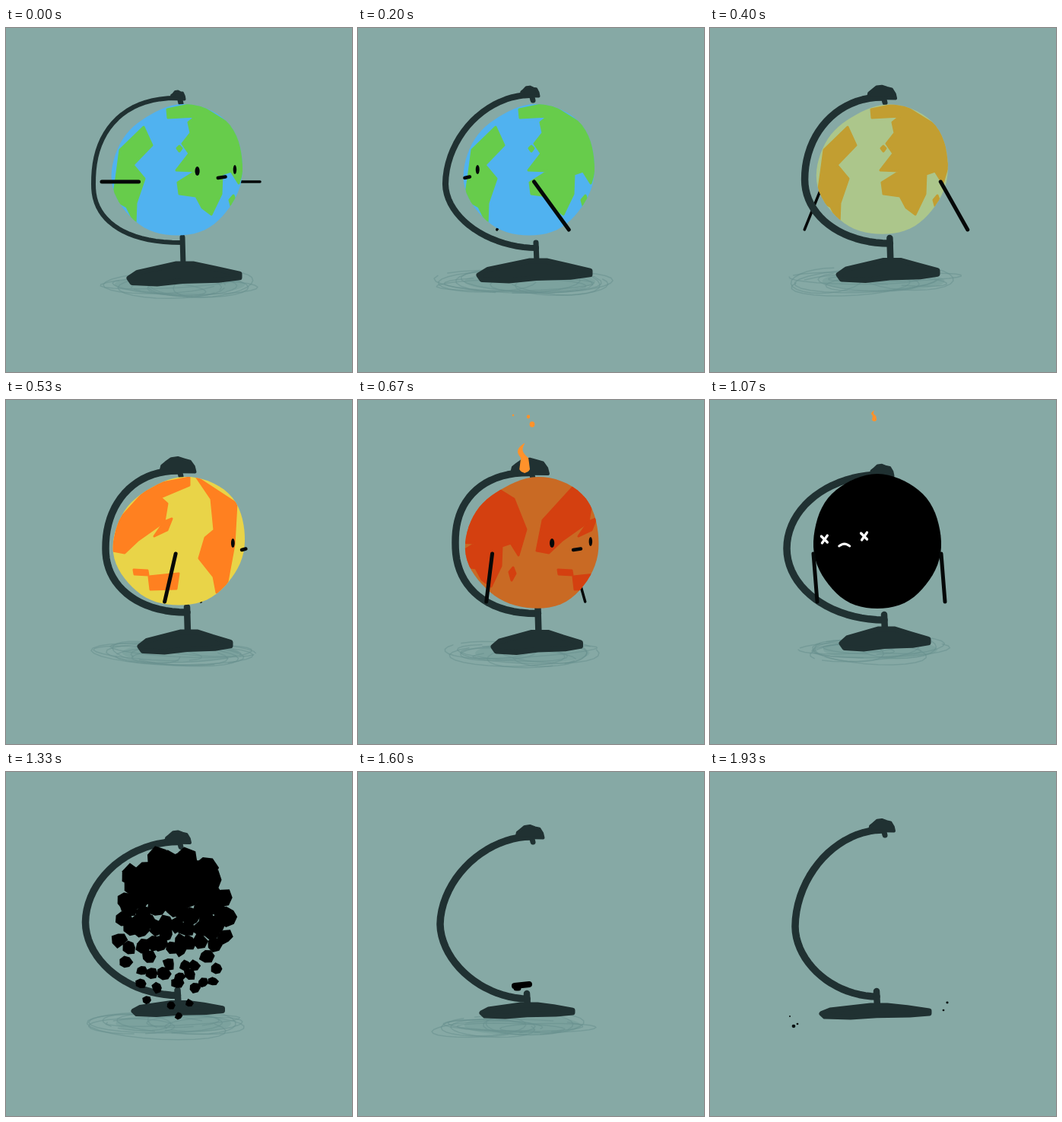
These frames come from a looping animation (455 by 452 pixels, 1.99 s). An HTML page with a canvas:

```html
<!DOCTYPE html>
<html lang="en">
<head>
<meta charset="utf-8">
<title>Overheating globe</title>
<style>
html, body { margin: 0; width: 100%; height: 100%; overflow: hidden; background: #86a9a5; }
canvas { display: block; }
</style>
</head>
<body>
<canvas id="stage" width="455" height="452"></canvas>
<script>
const g = document.getElementById('stage').getContext('2d');
const { PI, sin, cos, abs, min, max, sqrt } = Math;
const LOOP = 1990, STEP = 200 / 3, INK = '#203132', BLACK = '#050808', FIRE = '#ff922b';

// Key poses; the steps between them are blended.
const KEYS = [0, 3, 8, 12, 16, 24, 29];
// ring top y, left x, middle y, foot x, foot y, squareness; knob width; base left, right, top
const STAND = [
  [92, 115, 205, 232, 282, 2.3, 21, 158, 311, 307],
  [88, 115, 205, 234, 289, 1.9, 27, 155, 309, 303],
  [93, 131, 195, 238, 279, 2.15, 49, 172, 299, 302],
  [98, 125, 180, 235, 282, 2.4, 55, 176, 294, 303],
  [98, 101, 195, 229, 289, 2, 33, 169, 291, 298],
  [85, 108, 200, 222, 298, 1.85, 39, 159, 286, 303],
  [76, 112, 203, 219, 295, 1.9, 36, 143, 292, 304]
];
// centre, radii, bulge to the right, lean
const GLOBE = [
  [225, 187, 86, 86, 1.5, 3],
  [225, 187, 86, 86, 1.5, 3],
  [227.5, 186, 86.5, 84, 1.5, 3],
  [230, 190, 89, 88, 3, 0],
  [220, 186, 84, 88.5, 0, 0]
];
const SEA = [[80, 178, 240], [80, 178, 240], [233, 212, 72], [168, 0, 0], [0, 0, 0]];
const LAND = [[103, 204, 75], [103, 204, 75], [255, 128, 32], [168, 0, 0], [0, 0, 0]];
const TURN = [[40], [-74], [-283], [-358], [-394]];

const ATLANTIC = [
  [181,130, 192,154, 167,180, 182,198, 171,230, 170,257, 159,235, 141,225, 146,190, 150,160],
  [212,107, 250,99, 300,130, 316,170, 306,204, 296,188, 284,192, 283,218, 270,245, 258,236,
   250,221, 228,218, 226,203, 250,188, 224,187, 241,165, 232,152, 243,138, 240,124, 250,116, 213,118],
  [225,158, 228,155, 231,158, 228,162],
  [294,226, 299,220, 302,228, 297,237]
];
const PACIFIC = [
  [241,102, 190,112, 148,158, 140,198, 156,201, 174,184, 208,160, 212,136, 203,128, 241,112],
  [218,156, 208,160, 195,179, 212,171],
  [188,232, 227,228, 224,248, 190,249],
  [168,223, 186,224, 187,230, 169,229],
  [251,102, 303,136, 300,190, 288,255, 277,253, 273,232, 254,208, 262,181, 274,171, 270,130]
];

const lerp = (a, b, t) => a + (b - a) * t;
const rad = deg => deg * PI / 180;

function at(rows, f) {
  let i = 0;
  while (i < rows.length - 1 && KEYS[i + 1] <= f) i++;
  const next = rows[i + 1];
  return next ? rows[i].map((v, j) => lerp(v, next[j], (f - KEYS[i]) / (KEYS[i + 1] - KEYS[i]))) : rows[i];
}

function random(seed) {
  let s = seed * 7919 + 17;
  return () => (s = (s * 16807) % 2147483647) / 2147483647;
}

// Flat list of n points from a rule
const trace = (n, rule) => Array.from({ length: n }, (_, i) => rule(i, i / (n - 1))).flat();

function path(p) {
  g.beginPath();
  for (let i = 0; i < p.length; i += 2) g.lineTo(p[i], p[i + 1]);
}

function line(p, width, color) {
  path(p);
  g.lineWidth = width;
  g.strokeStyle = color;
  g.stroke();
}

// Filled polygon whose corners are rounded by its outline
function blob(p, color, round = 0) {
  path(p);
  g.closePath();
  g.fillStyle = g.strokeStyle = color;
  g.fill();
  if (!round) return;
  g.lineWidth = round;
  g.stroke();
}

function dot(x, y, rx, ry, color) {
  g.beginPath();
  g.ellipse(x, y, rx, ry, 0, 0, 7);
  g.fillStyle = color;
  g.fill();
}

function drawShadow(f) {
  if (f > 24) return;
  const [left, right, top] = at(STAND, f).slice(7), rnd = random(f + 1);
  const cx = (left + right) / 2 - 16, w = (right - left) / 2 + 46, cy = top + 30;
  dot(cx + 10, cy, w * .7, 13, 'rgba(108,148,145,.35)');
  for (let i = 0; i < 9; i++) {
    const size = .4 + rnd() * .45, x = cx + (rnd() - .5) * 2 * w * (1 - size);
    const y = cy + (rnd() - .5) * 10, h = 5 + rnd() * 13, tilt = (rnd() - .5) * 12, start = rnd() * 6;
    line(trace(24, (k, u) => {
      const a = start + u * 6;
      return [x + cos(a) * w * size, y + sin(a) * h + cos(a) * tilt];
    }), 1.5, 'rgba(104,145,142,.55)');
  }
}

function drawStand(f) {
  const [top, left, mid, footX, footY, bend, knob, l, r, peak] = at(STAND, f);
  const width = min(9.5, 6 + f * .7), low = top + 3, h = f < 17 ? 29 : 18;
  const ring = trace(41, (i, u) => {
    const a = (u - .5) * PI, s = abs(sin(a));
    const x = lerp(left, a < 0 ? 226 : footX, 1 - (1 - s ** bend) ** (1 / bend));
    return [x, lerp(mid, a < 0 ? top : footY, s)];
  });
  line(ring, width, INK);
  line([footX, footY - 7, footX + 1, peak + 5], max(7, width - 1), INK);
  line([229, low, 230, low + 4], 7, INK);

  const dome = trace(9, (i, u) => [
    226 - cos(u * PI) * (knob / 2 - 2), low - 2 - sin(u * PI) * (knob * .3 + 3) + sin(i * 4)
  ]);
  blob(dome, INK, 4);
  blob([
    l + 4, peak + h * .75, lerp(l, footX, .2), peak + h * .5, footX - 8, peak + 3, footX + 14, peak + 3,
    lerp(footX, r, .55), peak + h * .32, r - 4, peak + h * .56, r - 4, peak + h * .72,
    lerp(footX, r, .6), peak + h * .84, footX, peak + h * .88, lerp(l, footX, .55), peak + h, l + 8, peak + h * .95
  ], INK, 7);
}

function drawGlobe(f) {
  const [cx, cy, rx, ry, bulge, lean] = at(GLOBE, f);
  blob(trace(73, (i, u) => {
    const a = u * 2 * PI, k = bulge * (cos(a) - cos(3 * a)) - lean * sin(2 * a) + .5 * sin(7 * a);
    return [cx + cos(a) * (rx + k), cy + sin(a) * (ry + k)];
  }), `rgb(${at(SEA, f)})`);
  if (f >= 12) return;
  g.save();
  g.clip();
  // Each step brings the next third of the world into view.
  const view = f % 3, color = `rgb(${at(LAND, f)})`;
  const shown = [[ATLANTIC, view * -95], [PACIFIC, (2 - view) * 95]].filter(m => abs(m[1]) < 100);
  for (const [shapes, shift] of view ? shown : [[ATLANTIC, 0]]) {
    g.save();
    g.translate(shift, 0);
    for (const shape of shapes) blob(shape, color, 3);
    g.restore();
  }
  g.restore();
}

function drawFace(f) {
  const [cx, , r] = at(GLOBE, f), turn = at(TURN, f)[0], dead = f > 13;
  const place = (deg, draw) => {
    const a = rad(turn + deg);
    if (cos(a) > .1) draw(cx + r * sin(a), cos(a));
  };
  for (const side of [-1, 1]) place(side * 22, (x, c) => {
    if (!dead) return dot(x, 187 - side, 1.4 + 1.8 * c, 6, BLACK);
    const y = 181 - side * 2;
    line([x - 4, y - 4, x + 4, y + 4], 3.2, '#fff');
    line([x + 4, y - 5, x - 3, y + 5], 3.2, '#fff');
  });
  place(3, (x, c) => {
    if (dead) line(trace(9, (i, u) => [x - 7 + u * 14, 192 - 3 * sin(u * PI)]), 3, '#fff');
    else line([x - 2 - 4 * c, 197, x + 2 + 4 * c, 195.5], 4.5, BLACK);
  });
}

// Arms fly outwards while the spin is fast and sink as it slows.
function drawArms(f, front) {
  const [cx, , r] = at(GLOBE, f), turn = max(-360, at(TURN, f)[0]);
  const speed = min(1, max(0, (8 - f) / 5));
  for (const side of [-90, 90]) {
    const s = sin(rad(turn + side)), c = cos(rad(turn + side));
    if (c > -.2 !== front) continue;
    const x = cx + r * s * abs(s), hand = x + 5 + s * 85 * speed + c * lerp(-20, 18, speed);
    line([x, 202, hand, 202 + min(f, 3) * 21], front ? 5 : 3.5, BLACK);
  }
}

function drawFlame(f) {
  if (f < 9 || f > 16) return;
  const d = f - 12, gone = max(0, d), s = d < 0 ? 1 + d * .25 : 1 - d * .205;
  const edge = (u, side) => {
    const sway = 2 - 10 * sin(PI * max(0, u * 2 - 1));
    return [sway + side * 13 * (1 - u) ** .6 * min(1, sqrt(u * 8)), -79 * u];
  };
  g.save();
  g.translate(218 - gone * .6, 96 - gone * 17);
  g.scale(s ** .8, s);
  blob([...trace(25, (i, u) => edge(u, -1)), ...trace(25, (i, u) => edge(1 - u, 1))], FIRE);
  g.restore();
  if (abs(d) < 3)
    for (const [x, y, r] of [[224, 6, 2.2], [229, 16, 3.4], [204, 4, 1.2]]) dot(x, y - d * 8, r, r * 1.1, FIRE);
}

// The burnt globe breaks from below and drops as ash.
function drawCrumble(f) {
  const [cx, cy, rx, ry] = GLOBE[4], rnd = random(5);
  for (let i = 0; i < 90; i++) {
    const a = i * 2.4, k = sqrt((i + .5) / 90) * .86, y = sin(a) * k;
    const age = max(0, f - 17.5 - (1 - y) * 1.25 - rnd() * .5);
    const size = 17 * (1 - age / 3.2), shift = (rnd() - .5) * 8 * age;
    const chunk = trace(7, j => {
      const b = j * .9, s = size * (.75 + rnd() * .4);
      return [cx + cos(a) * k * rx + shift + cos(b) * s, cy + y * ry + 12 * age * age + sin(b) * s];
    });
    if (size > 1) blob(chunk, '#000');
  }
}

function drawRemains(f) {
  if (f >= 22 && f < 26) {
    line([206, 281, 225, 279], 8, '#000');
    line([208, 284, 211, 284], 7, '#000');
  }
  if (f < 26) return;
  const t = (f - 25) / 4;
  for (const [x, y, r] of [[105, 321, 1], [110, 334, 2.4], [115, 331, 1.4], [307, 313, 1.4], [312, 303, 1.6]])
    dot(lerp(218, x, t), lerp(300, y, t) - 50 * t * (1 - t), r * (2 - t), r * (2 - t) * .9, '#071010');
}

function draw(f) {
  g.fillStyle = '#86a9a5';
  g.fillRect(0, 0, 455, 452);
  drawShadow(f);
  if (f < 18) drawArms(f, false);
  drawStand(f);
  if (f < 18) {
    drawGlobe(f);
    drawFace(f);
    drawArms(f, true);
  } else if (f < 24) {
    drawCrumble(f);
    if (f < 19) drawFace(f);
  }
  drawFlame(f);
  drawRemains(f);
}

g.lineCap = g.lineJoin = 'round';

// Steps of a fifteenth of a second, rounded to 10 ms
function tick() {
  const t = performance.now() % LOOP;
  draw(min(29, Math.floor((Math.floor(t / 10) * 10 + 4.9) / STEP)));
  requestAnimationFrame(tick);
}
tick();
</script>
</body>
</html>
```
